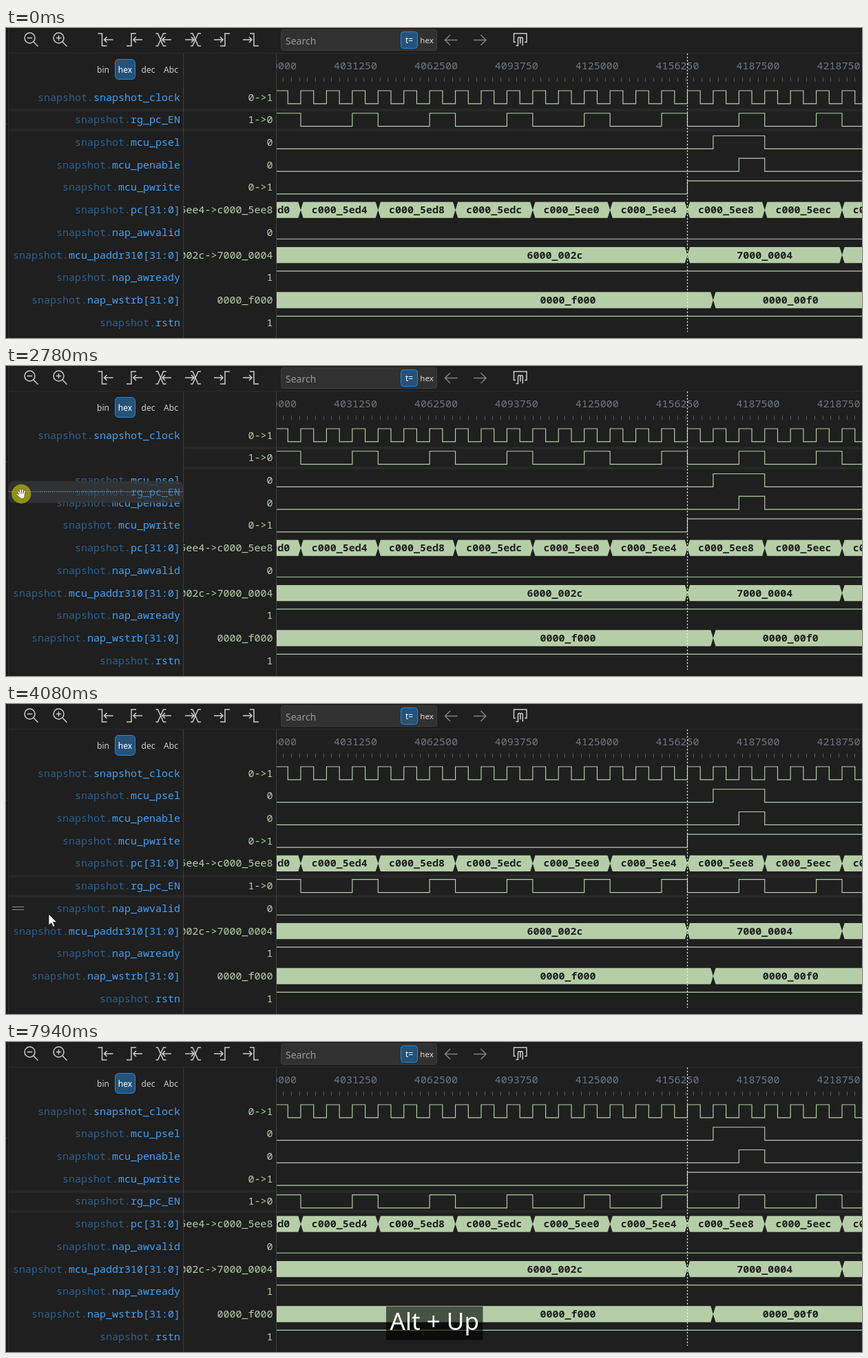
An HTML page with a canvas that plays this animation: 1243 px wide and 450 px high, repeating every 8000 ms.

```html
<!DOCTYPE html>
<html lang="en">
<head>
<meta charset="utf-8">
<title>Waveform viewer</title>
<style>
html, body { margin: 0; width: 100%; height: 100%; overflow: hidden; background: #1f1f1f; }
canvas { display: block; }
</style>
</head>
<body>
<canvas id="stage" width="1243" height="450"></canvas>
<script>
const ctx = document.getElementById('stage').getContext('2d');
const LOOP = 8000, ROW0 = 100.5, ROW_H = 32.73;
const CLOCK = 37.43, EDGE0 = 428, WAVE_X = 393, NAME_X = 257.5;
const MONO = '15px "Noto Sans Mono", "DejaVu Sans Mono", monospace';
const SANS = '"Noto Sans", "Open Sans", sans-serif';
const GREEN = '#b5cea8', BG = '#1f1f1f', LINE = '#2b2b2b';

const rowY = i => ROW0 + ROW_H * i;
const edgeX = k => EDGE0 + CLOCK * k;
const range = (n, f) => Array.from({ length: n }, (_, i) => f(i));

// bit: first level and toggling clock edges; bus: [text, first edge, last edge, text centre]
const signals = {
  clock: { name: 'snapshot_clock', value: '0->1', start: 1, toggles: range(47, i => (i - 1) / 2) },
  en: { name: 'rg_pc_EN', value: '1->0', start: 1, toggles: range(15, i => 3 * Math.floor(i / 2) + (i % 2 ? 2 : 0)) },
  psel: { name: 'mcu_psel', value: '0', start: 0, toggles: [16, 18] },
  penable: { name: 'mcu_penable', value: '0', start: 0, toggles: [17, 18] },
  pwrite: { name: 'mcu_pwrite', value: '0->1', start: 0, toggles: [15] },
  pc: {
    name: 'pc[31:0]', value: 'c000_5ee4->c000_5ee8',
    bus: range(9, i => ['c000_' + (0x5ed0 + 4 * i).toString(16), 3 * i - 3, 3 * i])
  },
  awvalid: { name: 'nap_awvalid', value: '0', start: 0, toggles: [] },
  paddr: {
    name: 'mcu_paddr310[31:0]', value: '6000_002c->7000_0004',
    bus: [['6000_002c', -3, 15, 797], ['7000_0004', 15, 21], ['', 21, 30]]
  },
  awready: { name: 'nap_awready', value: '1', start: 1, toggles: [] },
  wstrb: {
    name: 'nap_wstrb[31:0]', value: '0000_f000',
    bus: [['0000_f000', -3, 16, 816], ['0000_00f0', 16, 22]]
  },
  rstn: { name: 'rstn', value: '1', start: 1, toggles: [] }
};
const others = Object.keys(signals).filter(id => id !== 'en');

// Pointer phases: each pose is held for `step` ms; keys are [time, x, y]
const phases = [
  { from: 660, to: 1410, step: 68, keys: [[660, 590, 421], [900, 430, 345], [1150, 200, 225], [1410, 78, 153]] },
  { from: 1480, to: 2170, step: 70, keys: [[1480, 71, 149], [1550, 51, 140], [1700, 33, 139], [1900, 24, 138], [2170, 23, 137]] },
  { from: 2300, to: 3060, step: 76, keys: [[2300, 23, 138], [2450, 22, 148], [2700, 22, 175], [2900, 23, 213], [3060, 23, 238]] },
  { from: 3140, to: 3550, step: 68, keys: [[3140, 23, 245], [3280, 22, 257], [3420, 21, 265], [3550, 21, 280]] },
  { from: 3950, to: 4220, step: 90, keys: [[3950, 22, 281], [4040, 62, 305], [4130, 170, 358], [4220, 260, 420]] }
];

function pointerAt(t) {
  if (t < 660 || t >= 4220) return null;
  const { from, to, step, keys } = phases.filter(p => p.from <= t).pop();
  const time = Math.min(to, from + Math.floor((t - from) / step) * step);
  let i = 0;
  while (i < keys.length - 2 && keys[i + 1][0] < time) i++;
  const [a, b] = [keys[i], keys[i + 1]];
  const k = (time - a[0]) / (b[0] - a[0]);
  return { x: a[1] + (b[1] - a[1]) * k, y: a[2] + (b[2] - a[2]) * k };
}

function text(str, x, y, color, font = MONO, align = 'left') {
  ctx.font = font;
  ctx.textAlign = align;
  ctx.fillStyle = color;
  ctx.fillText(str, x, y);
}

function rect(x, y, w, h, color) {
  ctx.fillStyle = color;
  ctx.fillRect(x, y, w, h);
}

function box(x, y, w, h, r, fill, border) {
  ctx.beginPath();
  ctx.roundRect(x, y, w, h, r);
  ctx.fillStyle = fill;
  ctx.fill();
  if (border) {
    ctx.strokeStyle = border;
    ctx.lineWidth = 1;
    ctx.stroke();
  }
}

function stroke(d, color, width = 1.5, dash = []) {
  ctx.strokeStyle = color;
  ctx.lineWidth = width;
  ctx.setLineDash(dash);
  ctx.stroke(new Path2D(d));
  ctx.setLineDash([]);
}

function clipped(x, w, draw) {
  ctx.save();
  ctx.beginPath();
  ctx.rect(x, 37, w, 413);
  ctx.clip();
  draw();
  ctx.restore();
}

function drawToolbar() {
  const ink = '#cccccc';
  rect(4, 36, 1239, 1, LINE);
  for (const x of [34.5, 76.5]) {
    stroke(`M${x + 7.5} 14.5a7.5 7.5 0 1 0 -15 0a7.5 7.5 0 1 0 15 0M${x + 5.4} 20L${x + 12} 26.8M${x - 3.8} 14.5h7.6`, ink);
  }
  stroke('M76.5 10.7v7.6', ink);

  const falling = x => `M${x - 6} 8h6v18h7`;
  const rising = x => `M${x - 7} 26h7v-18h7`;
  const cross = x => `M${x - 7} 8h3l8 18h4M${x - 7} 26h3l8 -18h4`;
  const left = x => `M${x} 17h13M${x + 4} 13l-4 4l4 4`;
  const right = x => `M${x - 13} 17h13M${x - 4} 13l4 4l-4 4`;
  stroke(falling(139.5) + left(142.5), ink);
  stroke(rising(182) + left(185), ink);
  stroke(cross(224.5) + left(227), ink);
  stroke(cross(275) + right(273), ink);
  stroke(rising(318) + right(315), ink);
  stroke(falling(360) + right(357), ink);

  box(399.5, 2.5, 226, 30, 3, '#313131', '#3c3c3c');
  text('Search', 406, 23.5, '#989898', '14px ' + SANS);
  box(573.5, 5.5, 24, 24, 4, '#24527a', '#2488db');
  text('t=', 585.5, 22, '#ffffff', '12px ' + SANS, 'center');
  text('hex', 611, 22, '#dddddd', '11.5px ' + SANS, 'center');
  stroke('M637.5 17.5h18M645 10l-7.5 7.5l7.5 7.5M679 17.5h18M689.5 10l7.5 7.5l-7.5 7.5', '#808080');
  stroke('M740 20.5h-2.5v-12.5h18.5v12.5h-3M740.5 25.5h3v-10q0 -2 1.7 -2t1.7 2v7v-7q0 -2 1.7 -2t1.7 2v10', ink);
}

function drawHeader() {
  const small = '12px ' + SANS;
  box(158.5, 45.5, 29, 29, 5, '#24527a', '#2488db');
  text('bin', 141, 65, '#cccccc', small, 'center');
  text('hex', 173, 65, '#ffffff', small, 'center');
  text('dec', 206.5, 65, '#cccccc', small, 'center');
  text('Abc', 239.5, 65, '#cccccc', small, 'center');
  clipped(WAVE_X, 850, () => {
    for (let i = 0; i < 9; i++) text(4000000 + 31250 * i, 390.6 + 116.9 * i, 60, '#6e7681', MONO, 'center');
    for (let x = 402.3; x < 1243; x += 11.69) rect(Math.round(x), 72, 1, 6, '#50565d');
  });
}

function drawName(signal, y) {
  const base = Math.round(y) + 5;
  text(signal.name, 253, base, '#42a0f5', MONO, 'right');
  text('snapshot.', 253 - ctx.measureText(signal.name).width, base, '#2d6190', MONO, 'right');
}

function drawBit(signal, y) {
  let high = signal.start;
  const level = () => y + (high ? -9.5 : 9.4);
  ctx.beginPath();
  ctx.moveTo(WAVE_X - 2, level());
  for (const k of signal.toggles) {
    const x = edgeX(k);
    ctx.lineTo(x, level());
    high = !high;
    ctx.lineTo(x, level());
  }
  ctx.lineTo(1250, level());
  ctx.strokeStyle = GREEN;
  ctx.lineWidth = 1.17;
  ctx.stroke();
}

function drawBus(signal, y) {
  for (const [value, first, last, centre] of signal.bus) {
    const a = edgeX(first), b = edgeX(last), slant = 3.6, h = 11.7;
    ctx.fillStyle = GREEN;
    ctx.fill(new Path2D(`M${a} ${y}L${a + slant} ${y - h}L${b - slant} ${y - h}L${b} ${y}L${b - slant} ${y + h}L${a + slant} ${y + h}Z`));
    text(value, centre || (a + b) / 2, Math.round(y) + 5, BG, '600 ' + MONO, 'center');
  }
}

function drawRows(order, dragging) {
  const selected = rowY(order.indexOf('en'));
  const bandX = dragging ? NAME_X : 4;
  for (const y of [selected - 16.4, selected + 12.4]) rect(bandX, Math.round(y), 1243 - bandX, 4, '#272727');
  rect(257, 37, 1, 413, '#3c3c3c');
  rect(392, 37, 1, 413, '#3c3c3c');
  order.forEach((id, i) => {
    const signal = signals[id], y = rowY(i);
    if (!(dragging && id === 'en')) drawName(signal, y);
    clipped(258, 134, () => text(signal.value, 387.5, Math.round(y) + 5, GREEN, MONO, 'right'));
    clipped(WAVE_X, 850, () => (signal.bus ? drawBus : drawBit)(signal, y));
  });
  stroke('M989.5 37V441', '#f0f0f0', 1.17, [2.34, 2.34]);
}

function drawDrag(y) {
  const boundary = Math.round((y - ROW0 - ROW_H / 2) / ROW_H) * ROW_H + ROW0 + ROW_H / 2;
  const ghostY = y - 2.5;
  box(4, ghostY - 16.4, 253, 32, 8, 'rgba(50,53,56,0.82)');
  ctx.globalAlpha = 0.7;
  drawName(signals.en, ghostY);
  ctx.globalAlpha = 1;
  stroke(`M4 ${Math.floor(boundary) + 0.5}H257`, 'rgba(220,220,220,0.65)', 1, [1.5, 1.5]);
}

function drawHand(x, y) {
  const fingers = 'M-2.6 1L-4 -3.6M-0.8 0L-1.3 -5.8M1.4 0L1.7 -5.8M3.6 1L4.7 -3.8M-2.4 4L-6 0.8';
  const palm = 'M-3.4 0H4.4V3Q4 6.5 1 6.5Q-1.6 6.5 -3.4 3.5Z';
  ctx.save();
  ctx.translate(x, y);
  ctx.lineCap = ctx.lineJoin = 'round';
  stroke(fingers, '#4a4810', 2.8);
  stroke(palm, '#4a4810', 1.2);
  stroke(fingers, '#ffffff', 1.7);
  ctx.fillStyle = '#ffffff';
  ctx.fill(new Path2D(palm));
  ctx.restore();
}

function drawArrow(x, y) {
  const shape = new Path2D('M0 0V16.2L3.8 12.7L6.4 18.6L9 17.5L6.5 11.7H11.7Z');
  ctx.save();
  ctx.translate(x, y);
  ctx.fillStyle = '#ffffff';
  ctx.fill(shape);
  ctx.strokeStyle = '#111111';
  ctx.lineWidth = 0.8;
  ctx.stroke(shape);
  ctx.restore();
}

function drawPointer({ x, y }, t) {
  const pressed = t >= 2170 && t < 3950;
  const row = Math.round((y - ROW0) / ROW_H);
  if (x < 257 && !(t >= 2300 && t < 3950) && row < 11) {
    const h = Math.round(rowY(row));
    rect(9, h - 3, 17, 1, '#909090');
    rect(9, h + 1, 17, 1, '#909090');
  }
  if (pressed) {
    ctx.beginPath();
    ctx.arc(x, y, 14, 0, 7);
    ctx.fillStyle = 'rgba(160,155,18,0.9)';
    ctx.fill();
  }
  if (x < 28) drawHand(x, y);
  else drawArrow(x, y);
}

function drawKeys(label, x, w) {
  rect(x, 384, w, 48.5, 'rgba(0,0,0,0.6)');
  text(label, x + w / 2, 417.5, '#ffffff', '35px ' + SANS, 'center');
}

function render(t) {
  const dragging = t >= 2300 && t < 3950;
  const slot = t < 3950 ? 1 : t < 5800 ? 5 : 4;
  const order = [...others.slice(0, slot), 'en', ...others.slice(slot)];
  const pointer = pointerAt(t);

  rect(0, 0, 1243, 450, BG);
  rect(0, 0, 3, 450, '#181818');
  rect(3, 0, 1, 450, LINE);
  rect(0, 139, 3, 1, LINE);
  drawToolbar();
  drawHeader();
  drawRows(order, dragging);
  if (dragging) drawDrag(pointer.y);
  if (pointer) drawPointer(pointer, t);
  if ((t >= 5340 && t < 5740) || (t >= 7670 && t < 7940)) drawKeys('Alt', 595.5, 54);
  if ((t >= 5740 && t < 6660) || t >= 7940) drawKeys('Alt + Up', 552, 140.5);
}

const began = performance.now();
function tick() {
  render((performance.now() - began) % LOOP);
  requestAnimationFrame(tick);
}
tick();
</script>
</body>
</html>
```
